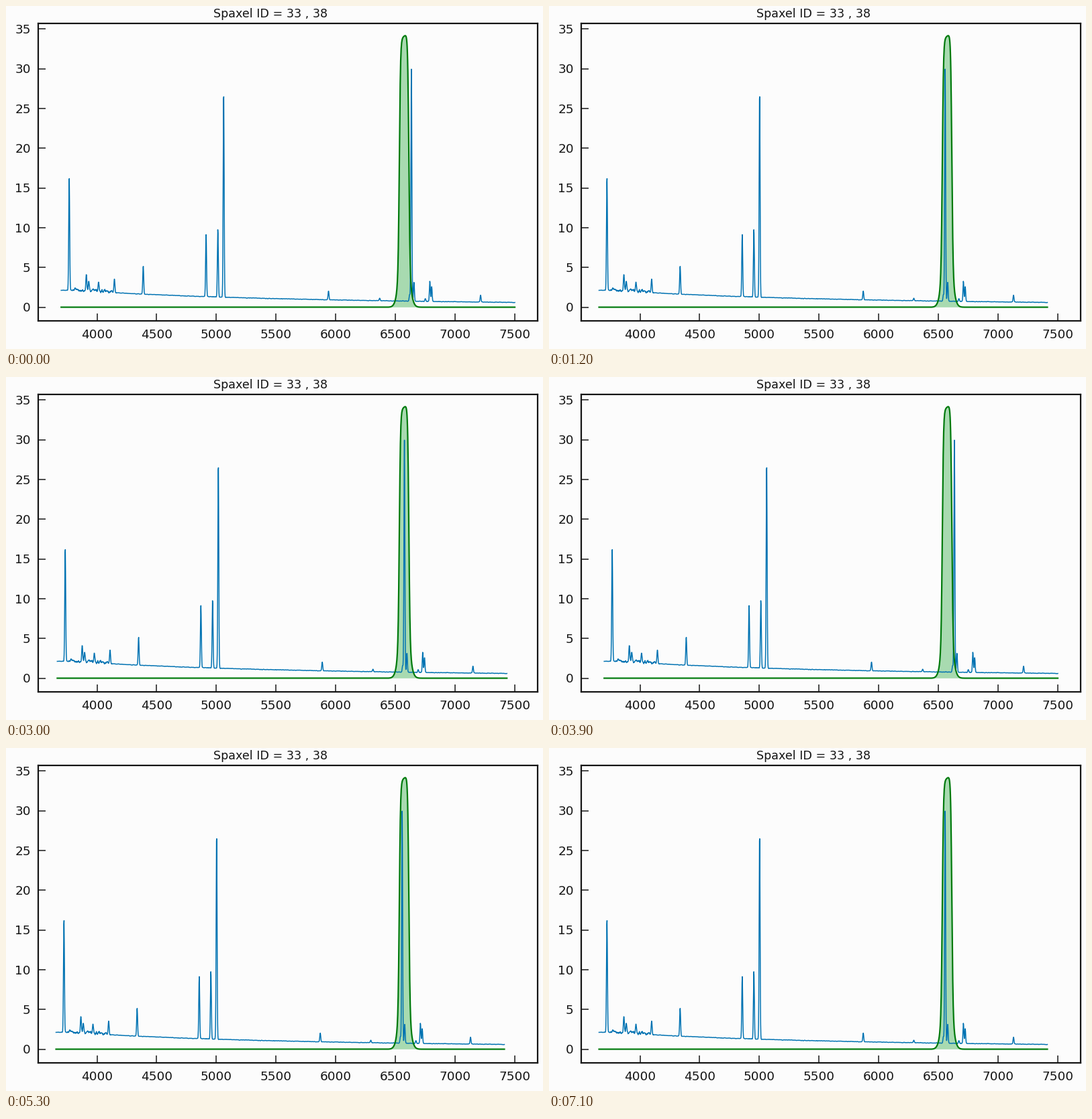
Write a matplotlib script that moves like this. It is 800 px wide and 512 px high and loops after 7200 ms.

```python
import numpy as np
import matplotlib.pyplot as plt
from matplotlib.animation import FuncAnimation
from matplotlib.patches import Polygon

W, H, DPI = 800, 512, 100
INK, PAPER = "#141414", "#fcfcfc"
FRAMES, STEP = 72, 100
PX = 72 / DPI  # points per pixel
LEFT, RIGHT, TOP, BOTTOM = 48.4, 791.8, 26, 470
X0, X1, Y0, Y1 = 3510, 7690, -1.7, 35.7

plt.rcParams["font.family"] = "DejaVu Sans"
fig = plt.figure(figsize=(W / DPI, H / DPI), dpi=DPI, facecolor=PAPER)
ax = fig.add_axes([LEFT / W, 1 - BOTTOM / H, (RIGHT - LEFT) / W, (BOTTOM - TOP) / H],
                  facecolor=PAPER)
ax.set(xlim=(X0, X1), ylim=(Y0, Y1))
x_ticks, y_ticks = range(4000, 7501, 500), range(0, 36, 5)
ax.set_xticks(x_ticks)
ax.set_yticks(y_ticks)
ax.tick_params(direction="in", length=11 * PX, width=1.5 * PX, color=INK,
               labelbottom=False, labelleft=False)
for spine in ax.spines.values():
    spine.set(linewidth=2.2 * PX, color=INK)


def label(x, y, text, size, ha):
    fig.text(x / W, 1 - y / H, text, fontsize=size * PX, ha=ha,
             va="baseline", color=INK)


for v in x_ticks:
    label(LEFT + (v - X0) / (X1 - X0) * (RIGHT - LEFT), 496.3, str(v), 18.5, "center")
for v in y_ticks:
    label(36.8, BOTTOM - (v - Y0) / (Y1 - Y0) * (BOTTOM - TOP) + 6.6, str(v), 18.5, "right")
label(394, 17.3, "Spaxel ID = 33 , 38", 17.5, "center")

# Rest wavelengths and peak fluxes; the Balmer lines follow their series formula
REDSHIFT = 0.0108
BALMER = [30.05, 9.15, 5.2, 3.55, 3.2, 3.3]
LINES = {3727: 16.45, 3869: 4.15, 4959: 9.85, 5007: 27.2, 5876: 2.05, 6300: 1.15,
         6548: 1.6, 6584: 3.2, 6678: 1.1, 6716: 3.3, 6731: 2.6, 7136: 1.55}
LINES.update({3646 * n**2 / (n**2 - 4): peak for n, peak in enumerate(BALMER, 3)})


def continuum(x):
    return np.minimum(2.15, 1.5 * (4640 / x) ** 1.85)


def step(d):
    return 0.5 + 0.5 * np.tanh(d / 10)


def band(x):
    """Flat-topped filter with soft feet."""
    d = x - 6573
    core = step(d + 40) * step(39 - d)
    foot = 8 * np.exp(-(d / 50) ** 2)
    return core * (34.1 + 0.012 * d) + (1 - core) * foot + 0.02


wave = np.arange(3700, 7501, 2.0)
rng = np.random.default_rng(5)
noise = np.convolve(rng.normal(size=wave.size), np.ones(5) / 5, "same")
blue_end = np.exp(-((wave - 3965) / 180) ** 6)
flux = continuum(wave) + 0.03 * noise + blue_end * (0.1 + 0.22 * noise)
for rest, peak in LINES.items():
    centre = rest * (1 + REDSHIFT)
    profile = np.exp(-0.5 * ((wave - centre) / 3.9) ** 2)
    flux += (peak - flux) * profile

spectrum, = ax.plot([], [], color="#0072b2", lw=1.5 * PX, zorder=2)
curve, = ax.plot([], [], color="#007a0c", lw=2.2 * PX, zorder=3)
fill = ax.add_patch(Polygon([(0, 0), (1, 0), (1, 1)], facecolor=(0.05, 0.61, 0.14, 0.35),
                            edgecolor="none", zorder=1))

# Steps at which the sweep turns round, starting from the observed frame
TURNS = [4, 12.5, 23.5, 32.5, 39, 53, 61, 71]
Z_MAX = 0.0118


def sweep(i):
    """Triangle wave between 0 and 1, resting briefly at both ends."""
    phase = np.interp(i, TURNS, range(len(TURNS))) % 2
    return np.clip(0.5 + 1.15 * (0.5 - abs(phase - 1)), 0, 1)


def update(i):
    x = wave / (1 + Z_MAX * sweep(i))
    response = band(x)
    spectrum.set_data(x, flux)
    curve.set_data(x, response)
    fill.set_xy(np.vstack([[x[0], 0], np.column_stack([x, response]), [x[-1], 0]]))
    return spectrum, curve, fill


anim = FuncAnimation(fig, update, frames=FRAMES, interval=STEP,
                     repeat=True, repeat_delay=0)
plt.show()
```
